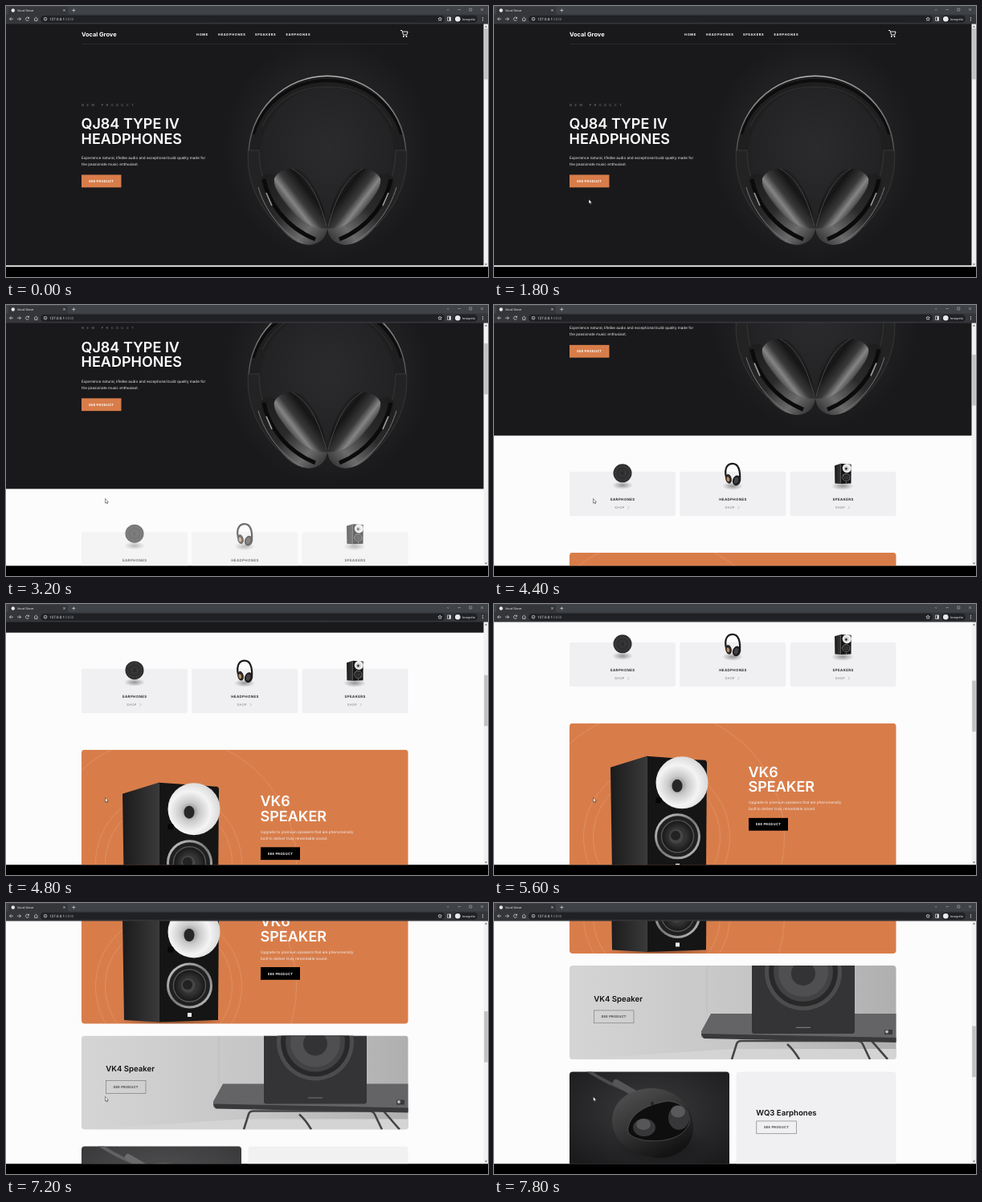
An HTML page for the animation above (8000 ms loop, 600 by 338 pixels).

```html
<!DOCTYPE html>
<html lang="en">
<head>
<meta charset="utf-8">
<title>Shop page</title>
<style>
html, body { margin: 0; width: 100%; height: 100%; overflow: hidden; background: #000; }
svg { display: block; width: 100vw; height: 100vh; font-family: Inter, sans-serif; text-rendering: geometricPrecision; }
.ui { font: 3.8px Roboto, sans-serif; fill: #e8eaed; }
.icon { fill: none; stroke: #dcdee1; stroke-width: .7; }
.big { font-size: 18px; font-weight: 600; fill: #fff; }
.body { font-size: 4.6px; fill: #f0eff0; }
.nav { font-size: 4px; font-weight: 700; letter-spacing: .65px; fill: #fff; }
.btn { font-size: 4px; font-weight: 700; letter-spacing: .28px; fill: #fff; text-anchor: middle; }
.name { font-size: 9.6px; font-weight: 600; fill: #101010; }
.label { font-size: 4.4px; font-weight: 600; letter-spacing: .4px; text-anchor: middle; fill: #151515; }
.shop { font-size: 3.9px; font-weight: 500; letter-spacing: .35px; text-anchor: middle; fill: #8a8889; }
.outline { fill: none; stroke: #707070; stroke-width: .6; }
.ring { fill: none; stroke: #fff; stroke-opacity: .24; stroke-width: .6; }
</style>
</head>
<body>
<svg viewBox="0 0 600 338" preserveAspectRatio="none">
<defs>
  <clipPath id="view"><rect y="22" width="595" height="303.5"/></clipPath>
  <clipPath id="zx"><rect x="94" y="149" width="406.5" height="188.5" rx="4"/></clipPath>
  <clipPath id="wide"><rect x="94" y="78" width="406.5" height="117" rx="4"/></clipPath>
  <clipPath id="photo"><rect x="94" y="210.5" width="199" height="117.5" rx="4"/></clipPath>
  <radialGradient id="glow"><stop stop-color="#2b2a2c"/><stop offset=".6" stop-color="#232224"/><stop offset="1" stop-color="#19181a"/></radialGradient>
  <radialGradient id="shade"><stop stop-color="#000" stop-opacity=".38"/><stop offset="1" stop-color="#000" stop-opacity="0"/></radialGradient>
  <linearGradient id="pad" x1=".1" y1=".8" x2=".8" y2=".2"><stop stop-color="#111112"/><stop offset=".22" stop-color="#3a3a3b"/><stop offset=".38" stop-color="#858586"/><stop offset=".52" stop-color="#3a3a3b"/><stop offset=".75" stop-color="#151516"/><stop offset="1" stop-color="#2b2b2c"/></linearGradient>
  <linearGradient id="plate" x1="0" y1="0" x2="1" y2="1"><stop stop-color="#1b1b1c"/><stop offset=".45" stop-color="#2b2b2c"/><stop offset=".75" stop-color="#6b6b6c"/><stop offset="1" stop-color="#252526"/></linearGradient>
  <linearGradient id="band" x1="0" y1="1" x2=".8" y2="0"><stop stop-color="#4b4b4c"/><stop offset=".5" stop-color="#858586"/><stop offset="1" stop-color="#b5b5b5"/></linearGradient>
  <linearGradient id="side"><stop stop-color="#1b1b1c"/><stop offset="1" stop-color="#39393a"/></linearGradient>
  <radialGradient id="horn" cx=".42" cy=".55" r=".6"><stop stop-color="#777"/><stop offset=".3" stop-color="#c9c9c9"/><stop offset=".65" stop-color="#f4f4f4"/><stop offset="1" stop-color="#d6d6d6"/></radialGradient>
  <linearGradient id="metal" x2="1" y2="1"><stop stop-color="#d5d5d5"/><stop offset=".5" stop-color="#777"/><stop offset="1" stop-color="#c4c4c4"/></linearGradient>
  <radialGradient id="cone"><stop stop-color="#1b1b1b"/><stop offset=".5" stop-color="#353535"/><stop offset="1" stop-color="#161616"/></radialGradient>
  <linearGradient id="wall"><stop stop-color="#d6d5d6"/><stop offset=".55" stop-color="#c6c5c6"/><stop offset="1" stop-color="#b0afb0"/></linearGradient>
  <linearGradient id="case" x2=".6" y2="1"><stop stop-color="#565657"/><stop offset=".5" stop-color="#363637"/><stop offset="1" stop-color="#131314"/></linearGradient>
  <radialGradient id="desk" cx=".5" cy=".4" r=".7"><stop stop-color="#3a393b"/><stop offset="1" stop-color="#1b1a1c"/></radialGradient>

  <g id="half">
    <path d="M302 186A98 99 0 0 1 400 87V101A84 88 0 0 0 316 186Z" fill="#1f1f20"/>
    <path d="M308 160A95 92 0 0 1 400 93" fill="none" stroke="#0d0d0e" stroke-width="4"/>
    <path d="M302 186A98 99 0 0 1 400 87.200" fill="none" stroke="url(#band)" stroke-width="1.500"/>
    <path d="M319 150A84 86 0 0 1 400 101" fill="none" stroke="#3b3b3c" stroke-width=".7"/>
    <path d="M301.500 180C299 212 310 246 340 276L350 266C328 242 315 213 315 180Z" fill="#232324" stroke="#454546" stroke-width=".6"/>
    <path d="M318 214C324 207 332 208 338 214L400 277C399 288 392 297 378 298C362 298 344 284 332 264C321 246 315 226 318 214Z" fill="url(#plate)"/>
    <path d="M321 216C326 244 348 276 385 291" fill="none" stroke="#0b0b0c" stroke-width="5"/>
    <path d="M314 226C322 254 342 282 370 296" fill="none" stroke="#777778" stroke-width="1"/>
    <path d="M324 233L331 249" stroke="#a0a0a1" stroke-width="1.600"/>
    <path d="M334 215C340 203 356 200 367 206C386 219 396 248 400 277C387 280 368 271 353 252C341 237 332 225 334 215Z" fill="url(#pad)"/>
    <path d="M356 203C377 214 390 240 399 275" fill="none" stroke="#4b4b4c" stroke-width=".9"/>
  </g>

  <g id="tower">
    <path d="M145 63L190 49V194.500L147 192Z" fill="url(#side)"/>
    <path d="M190 49L262 54Q265 54 265 58L264 192L190 194.500Z" fill="#151516"/>
    <path d="M190.500 50V194" stroke="#4b4b4c" stroke-width=".8"/>
    <circle cx="234" cy="82" r="32.500" fill="url(#horn)"/>
    <ellipse cx="228" cy="86" rx="6.500" ry="8" fill="#272727"/>
    <circle cx="205" cy="104" r="4" fill="#060606"/>
    <circle cx="228.500" cy="149" r="28.500" fill="url(#metal)"/>
    <circle cx="228.500" cy="149" r="25.500" fill="#202021"/>
    <circle cx="228.500" cy="149" r="20" fill="url(#cone)" stroke="#555" stroke-width="1.400"/>
    <circle cx="227" cy="149" r="9" fill="#454546"/>
    <circle cx="226" cy="148" r="6" fill="#222"/>
    <rect x="226" y="183" width="5" height="5" fill="#eee"/>
  </g>
</defs>

<g clip-path="url(#view)">
  <rect width="600" height="338" fill="#fdfcfd"/>
  <g id="page">
    <rect width="600" height="323.5" fill="#19181a"/>
    <ellipse cx="400" cy="178" rx="130" ry="140" fill="url(#glow)"/>
    <text x="94" y="37.500" font-size="7.400" font-weight="700" fill="#fff">Vocal Grove</text>
    <g class="nav"><text x="237" y="36.500">HOME</text><text x="264" y="36.500">HEADPHONES</text><text x="310" y="36.500">SPEAKERS</text><text x="348.500" y="36.500">EARPHONES</text></g>
    <path d="M491 30.500h2l1.600 5.500h4.300l1.200-4h-6.500" fill="none" stroke="#fff" stroke-width=".9"/>
    <circle cx="494.800" cy="38" r=".9" fill="#fff"/><circle cx="498.500" cy="38" r=".9" fill="#fff"/>
    <path d="M94 47.500H500" stroke="#353436" stroke-width=".6"/>
    <text x="94" y="124.500" font-size="4.200" letter-spacing="3.350" fill="#7d7c7e">NEW PRODUCT</text>
    <g class="big"><text x="93.500" y="153">QJ84 TYPE IV</text><text x="93.500" y="171.500">HEADPHONES</text></g>
    <g class="body"><text x="94" y="190.700">Experience natural, lifelike audio and exceptional build quality made for</text><text x="94" y="198.700">the passionate music enthusiast.</text></g>
    <rect x="94" y="210.500" width="49.500" height="15.800" fill="#d87d4a"/>
    <text class="btn" x="118.700" y="220">SEE PRODUCT</text>
    <use href="#half"/><use href="#half" transform="matrix(-1 0 0 1 800 0)"/>

    <g transform="translate(0 160.5)"><g id="cats">
      <g fill="#f0eff1"><rect x="94" y="208" width="132" height="55.500" rx="3"/><rect x="231.200" y="208" width="132" height="55.500" rx="3"/><rect x="368.500" y="208" width="132" height="55.500" rx="3"/></g>
      <g fill="url(#shade)"><ellipse cx="160" cy="225" rx="13" ry="5"/><ellipse cx="297" cy="226" rx="13" ry="5"/><ellipse cx="434" cy="226" rx="14" ry="5"/></g>
      <circle cx="160" cy="210" r="11.500" fill="#2b2b2c"/>
      <circle cx="160" cy="210" r="8.500" fill="none" stroke="#454546" stroke-width="3" stroke-dasharray=".5 .7"/>
      <circle cx="160" cy="210" r="4" fill="none" stroke="#454546" stroke-width="3" stroke-dasharray=".5 .7"/>
      <path d="M289 215C286 202 292 198 297 198C304 198 307 206 306 219" fill="none" stroke="#1b1b1c" stroke-width="2.200"/>
      <ellipse cx="292" cy="217" rx="3.800" ry="6" fill="#2b2726" transform="rotate(-14 292 217)"/>
      <ellipse cx="291.300" cy="217.500" rx="1.800" ry="3" fill="#b78f62" transform="rotate(-14 291 217)"/>
      <ellipse cx="302" cy="219" rx="5" ry="6.500" fill="#1d1d1e" transform="rotate(18 302 219)"/>
      <ellipse cx="301.500" cy="219" rx="2.600" ry="4" fill="#474241" transform="rotate(18 302 219)"/>
      <use href="#tower" transform="translate(399.100 189.600) scale(.172)"/>
      <g class="label"><text x="160.300" y="244.600">EARPHONES</text><text x="297.500" y="244.600">HEADPHONES</text><text x="434.700" y="244.600">SPEAKERS</text></g>
      <g class="shop"><text x="156.500" y="254.200">SHOP</text><text x="293.700" y="254.200">SHOP</text><text x="431" y="254.200">SHOP</text></g>
      <path d="M166.500 251l1.600 1.800-1.600 1.800m137.200-3.600l1.600 1.800-1.600 1.800m137.200-3.600l1.600 1.800-1.600 1.800" fill="none" stroke="#b7a195" stroke-width=".6"/>
    </g></g>

    <g transform="translate(0 320.5)">
      <g clip-path="url(#zx)">
        <rect x="94" y="149" width="407" height="189" fill="#d87d4a"/>
        <g class="ring"><circle cx="202.500" cy="291" r="79"/><circle cx="202.500" cy="291" r="91"/><circle cx="202.500" cy="291" r="159"/></g>
        <ellipse cx="206" cy="335" rx="66" ry="5" fill="url(#shade)"/>
        <use href="#tower" y="141"/>
      </g>
      <g id="zxCopy">
        <g class="big"><text x="316.500" y="216">VK6</text><text x="316.500" y="234.500">SPEAKER</text></g>
        <g class="body"><text x="317" y="249.600">Upgrade to premium speakers that are phenomenally</text><text x="317" y="257.600">built to deliver truly remarkable sound.</text></g>
        <rect x="317" y="267" width="49" height="15.800"/>
        <text class="btn" x="341.500" y="276.500">SEE PRODUCT</text>
      </g>
    </g>

    <g transform="translate(0 595)">
      <g clip-path="url(#wide)">
        <rect x="94" y="78" width="407" height="117" fill="url(#wall)"/>
        <path d="M265 78V138" stroke="#bcbbbc" stroke-width=".8"/>
        <path d="M94 195L296 182H501V195Z" fill="#d5d4d5"/>
        <path d="M296 195L302 176Q303 172 308 172H452Q457 172 459 176L468 195M365 176Q373 183 380 195M470 172L490 195" fill="none" stroke="#454445" stroke-width="2.600"/>
        <path d="M270 138H501V173L261 168Q258 168 258 164L258 160Z" fill="#646365"/>
        <path d="M258 163L501 168V174L261 169Z" fill="#39383a"/>
        <path d="M321 78H449V160Q449 163 446 163H324Q321 163 321 160Z" fill="#343335"/>
        <circle cx="385" cy="86" r="48" fill="#4c4b4d"/>
        <circle cx="385" cy="86" r="43" fill="#292829"/>
        <circle cx="385" cy="86" r="37" fill="#424143"/>
        <circle cx="385" cy="86" r="31" fill="#4f4e50"/>
        <circle cx="385" cy="88" r="15" fill="#333234"/>
        <path d="M376 155.500H394" stroke="#777" stroke-width="1.200"/>
        <path d="M486 158h10v6h-10z" fill="#39383a"/><circle cx="489" cy="160.500" r="2" fill="#b7b6b7"/>
      </g>
      <g id="wideCopy">
        <text class="name" x="124.300" y="122.700">VK4 Speaker</text>
        <rect class="outline" x="124.500" y="134" width="49.500" height="15.800"/>
        <text class="btn" x="149.200" y="143.500" style="fill:#303030;font-weight:600">SEE PRODUCT</text>
      </g>
      <g id="ear">
        <g clip-path="url(#photo)">
          <rect x="94" y="210" width="200" height="119" fill="url(#desk)"/>
          <path d="M115 208Q142 226 172 236" fill="none" stroke="#4b4a4c" stroke-width="4"/>
          <path d="M152 224L176 238" stroke="#565557" stroke-width="8" stroke-linecap="round"/>
          <ellipse cx="208" cy="302" rx="60" ry="24" fill="url(#shade)"/>
          <path d="M147 270C148 245 172 230 199 231C227 233 247 252 248 278C249 303 230 318 206 318C172 317 146 296 147 270Z" fill="url(#case)"/>
          <path d="M167 280C171 262 190 251 217 247C236 249 245 262 243 275C236 294 210 299 187 296C172 293 165 288 167 280Z" fill="#0e0e0f" stroke="#5d5c5e" stroke-width=".7"/>
          <ellipse cx="187" cy="280" rx="14" ry="11" fill="#373638"/><ellipse cx="186" cy="276" rx="9" ry="7" fill="#565557"/>
          <ellipse cx="230" cy="268" rx="13" ry="15" fill="#373638"/><ellipse cx="229" cy="260" rx="9" ry="7.500" fill="#59585a"/>
          <circle cx="197" cy="250" r="2" fill="#242325"/>
        </g>
        <rect x="301.500" y="210.500" width="199" height="117.500" rx="4" fill="#f0eff1"/>
        <text class="name" x="326.300" y="265.300">WQ3 Earphones</text>
        <rect class="outline" x="326.800" y="272" width="49.500" height="15.800"/>
        <text class="btn" x="351.500" y="281.500" style="fill:#303030;font-weight:600">SEE PRODUCT</text>
      </g>
    </g>
  </g>
</g>

<rect x="594.500" y="22" width="5.500" height="303.5" fill="#f1f1f1"/>
<path d="M596 26.500l1.500-2 1.500 2zM596 321.500l1.500 2 1.500-2z" fill="#606060"/>
<rect id="thumb" x="595.200" y="28" width="4.500" height="63.500" fill="#c1c1c1"/>

<g class="ui">
  <rect width="600" height="22.500" fill="#35363a"/>
  <path d="M0 0H600V10.500H79Q77 10.500 77 8.500V3.500Q77 1 74.500 1H5.500Q3 1 3 3.500V8.500Q3 10.500 1 10.500H0Z" fill="#3f4246"/>
  <circle cx="8.800" cy="5.500" r="2.200"/>
  <text x="14" y="6.900">Vocal Grove</text>
  <path class="icon" d="M71.300 4.200l2.400 2.400m0-2.400l-2.400 2.400M82.300 5.400h4m-2-2v4"/>
  <path class="icon" d="M548.800 4l1.400 1.400 1.400-1.400M562.500 4.500h3.500M576.800 3h3v3h-3zM591 3l3 3m0-3l-3 3" opacity=".6"/>
  <rect x="43" y="11.800" width="503" height="9" rx="4.500" fill="#202124"/>
  <path class="icon" d="M9 16.200H4.500m2-2l-2 2 2 2M14 16.200h4.500m-2-2l2 2-2 2M28.300 15a2.100 2.100 0 1 0 .2 2M28.600 13.700v1.700h-1.700M35 16.200l2.300-2 2.300 2M35.700 16v2.400h3.200V16M549.500 14h4v4.400h-4z"/>
  <circle class="icon" cx="49" cy="16.200" r="1.900"/><path class="icon" d="M49 15.800v1.500"/>
  <text x="54.300" y="17.700" font-size="4.500">127.0.0.1<tspan fill="#85888c">:5050</tspan></text>
  <path class="icon" d="M540.200 13.900l.7 1.500 1.600.2-1.200 1.100.3 1.600-1.400-.8-1.400.8.300-1.600-1.200-1.100 1.600-.2z"/>
  <path d="M551.700 14h1.800v4.400h-1.800z"/>
  <rect x="557.500" y="11.800" width="29.500" height="9" rx="4.500" fill="#202124"/>
  <circle cx="562.300" cy="16.200" r="3.300"/>
  <text x="568" y="17.700">Incognito</text>
  <path d="M593 14h.9v.9h-.9zM593 15.800h.9v.9h-.9zM593 17.600h.9v.9h-.9z"/>
</g>
<rect y="325.500" width="600" height="12.500"/>
<path id="cursor" d="M0 0V5.600L1.300 4.500 2.200 6.500 3.100 6.100 2.200 4.200H3.900Z" fill="#fff" stroke="#111" stroke-width=".45"/>
</svg>
<script>
const LOOP = 8000;
const scrollKeys = [[2650, 0], [2800, 14], [3200, 94], [3600, 154], [3850, 160.5], [4400, 160.5], [4500, 176],
  [4850, 306], [5000, 320.5], [5600, 320.5], [5750, 340], [6200, 431], [6400, 461.5], [6800, 487], [7250, 510], [7800, 595], [8000, 601]];
const cursorKeys = [[0, -12, 246], [200, 0, 240], [600, 100, 180], [1200, 293, 36], [1400, 180, 130],
  [1600, 20, 225], [1800, 118, 241], [2400, 123.5, 241.5]];
const reveals = [["cats", 2900], ["zxCopy", 4250], ["wideCopy", 5950], ["ear", 6750]];
const byId = id => document.getElementById(id);

function track(keys, time) {
  const next = keys.findIndex(key => key[0] > time);
  if (next === 0) return keys[0].slice(1);
  if (next < 0) return keys.at(-1).slice(1);
  const from = keys[next - 1], to = keys[next];
  const part = (time - from[0]) / (to[0] - from[0]);
  return from.slice(1).map((value, i) => value + (to[i + 1] - value) * part);
}

function draw(now) {
  const time = now % LOOP;
  const [scroll] = track(scrollKeys, time);
  byId("page").setAttribute("transform", `translate(0 ${-scroll})`);
  byId("thumb").setAttribute("y", 28 + scroll * .211);
  byId("cursor").setAttribute("transform", `translate(${track(cursorKeys, time).join(" ")})`);
  for (const [id, start] of reveals) {
    const left = 1 - Math.min(1, Math.max(0, (time - start) / 1000));
    const shown = 1 - left * left;
    byId(id).setAttribute("transform", `translate(0 ${18 * (1 - shown)})`);
    byId(id).setAttribute("opacity", Math.min(1, shown * 1.25));
  }
  requestAnimationFrame(draw);
}
requestAnimationFrame(draw);
</script>
</body>
</html>
```
